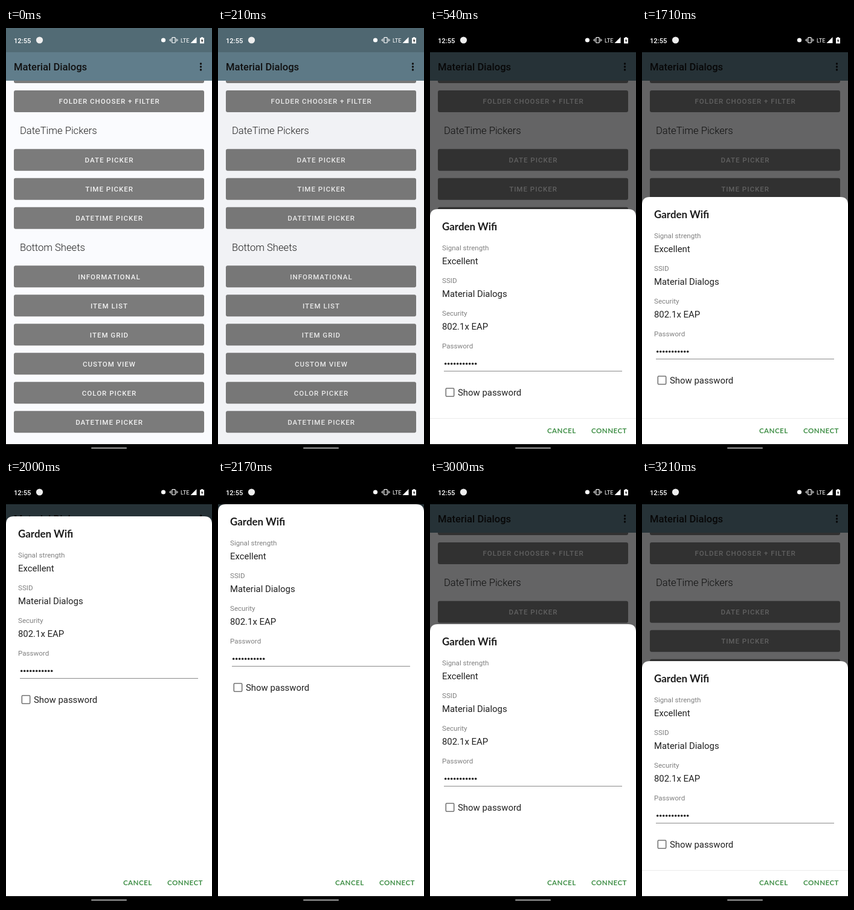
An HTML page for the animation above (3.37 s loop, 341 px wide and 700 px high).

```html
<!DOCTYPE html>
<html lang="en">
<head>
<meta charset="utf-8">
<title>Bottom sheet demo</title>
<style>
  html, body { margin: 0; height: 100%; overflow: hidden; background: #000; }
  svg { display: block; width: 100vw; height: 100vh; font-family: Roboto, sans-serif; }
  .button { font-size: 11.5px; font-weight: 500; letter-spacing: 1px; fill: #f2f2f2; text-anchor: middle; }
  .heading { font-size: 16.6px; font-weight: 300; fill: #222; }
  .label { font-size: 11.6px; fill: #808080; }
  .value { font-size: 14.9px; fill: #212121; }
  .title { font: 700 16.9px Lato, sans-serif; fill: #1c1c1c; }
  .action { font: 700 11.6px Lato, sans-serif; letter-spacing: .45px; fill: #43914a; }
</style>
</head>
<body>
<svg viewBox="0 0 341 700">
  <rect width="341" height="700" fill="#fafbfe"/>
  <g id="list"></g>
  <rect y="40" width="341" height="47" fill="#607d8b"/>
  <text x="13" y="70" font-size="16.6" font-weight="500" fill="#111">Material Dialogs</text>
  <g fill="#111">
    <circle cx="322.5" cy="59" r="1.7"/><circle cx="322.5" cy="64" r="1.7"/><circle cx="322.5" cy="69" r="1.7"/>
  </g>
  <rect width="341" height="40" fill="#526b75"/>
  <rect id="dim" width="341" height="700"/>
  <rect id="statusShade" width="341" height="40"/>

  <!-- status icons -->
  <g fill="#fff">
    <text x="13" y="24.5" font-size="11.2" font-weight="500">12:55</text>
    <circle cx="55.5" cy="20" r="5.6" fill="#eee"/>
    <circle cx="260.5" cy="20" r="3.6"/>
    <rect x="274.8" y="15.7" width="5.4" height="8.8" rx="1" fill="none" stroke="#fff" stroke-width="1.2"/>
    <path d="M272.7 17.5v5M271 18.7v2.6M282.3 17.5v5M284 18.7v2.6" stroke="#fff"/>
    <text x="289" y="24" font-size="9.3">LTE</text>
    <path d="M305.5 25H315.500V15Z"/>
    <path d="M323.200 15h2.600v1.200h2.200v9.300h-7v-9.300h2.200Z"/>
    <path d="M325 17.500l-2.200 4h1.500v2.700l2.200-4h-1.500Z" fill="#222"/>
  </g>

  <g id="windowLayer">
    <g id="sheet">
      <path d="M0 700V13Q0 0 13 0H328Q341 0 341 13V700Z" fill="#fff"/>
      <text class="title" x="20" y="35">Garden Wifi</text>
      <g id="fields"></g>
      <path d="M23 267.500H318" stroke="#8a8a8a"/>
      <rect x="26.300" y="295.800" width="13.400" height="13.400" rx="1.500" fill="none" stroke="#757575" stroke-width="1.600"/>
      <text class="value" x="46" y="308">Show password</text>
    </g>
    <g id="actions">
      <rect y="644" width="341" height="43" fill="#fff"/>
      <path id="divider" d="M0 644.500H341" stroke="#ebebeb"/>
      <text class="action" x="194" y="669">CANCEL</text>
      <text class="action" x="267" y="669">CONNECT</text>
    </g>
  </g>

  <rect y="687" width="341" height="13"/>
  <rect x="141" y="692.500" width="59" height="2" rx="1" fill="#a6a6a6"/>
</svg>
<script>
const $ = id => document.getElementById(id);
const clamp = x => Math.min(1, Math.max(0, x));
const decelerate = x => 1 - (1 - clamp(x)) ** 2;

function add(parent, tag, attrs, text = '') {
  const node = document.createElementNS('http://www.w3.org/2000/svg', tag);
  for (const name in attrs) node.setAttribute(name, attrs[name]);
  node.textContent = text;
  parent.append(node);
}

function addButton(y, text) {
  add($('list'), 'rect', { x: 13, y, width: 315, height: 36, rx: 3, fill: '#7b7b7b' });
  add($('list'), 'text', { class: 'button', x: 171, y: y + 22.3 }, text);
}

function addSection(y, heading, buttons) {
  add($('list'), 'text', { class: 'heading', x: 23, y }, heading);
  buttons.forEach((text, i) => addButton(y + 24.5 + i * 48, text));
}

addButton(55, '');
addButton(103, 'FOLDER CHOOSER + FILTER');
addSection(175.3, 'DateTime Pickers', ['DATE PICKER', 'TIME PICKER', 'DATETIME PICKER']);
addSection(367.8, 'Bottom Sheets', ['INFORMATIONAL', 'ITEM LIST', 'ITEM GRID',
  'CUSTOM VIEW', 'COLOR PICKER', 'DATETIME PICKER']);

[['Signal strength', 'Excellent'], ['SSID', 'Material Dialogs'],
 ['Security', '802.1x EAP'], ['Password', '']].forEach(([label, value], i) => {
  add($('fields'), 'text', { class: 'label', x: 20, y: 68.3 + i * 54 }, label);
  add($('fields'), 'text', { class: 'value', x: 20, y: 91 + i * 54 }, value);
});
for (let i = 0; i < 11; i++)
  add($('fields'), 'circle', { cx: 25.7 + i * 5, cy: 255.3, r: 1.75, fill: '#212121' });

const LOOP = 3370, FPS = 24, BOTTOM = 687, PEEK = 388;

// Dragging and settling: [step, top of sheet]
const drag = [[40, 299], [41, 279], [42, 250], [44, 177], [46, 110], [47, 82], [48, 60],
  [49, 50], [50, 44], [52, 40], [67, 40], [68, 75], [70, 163], [72, 238], [74, 281],
  [76, 297], [77, 299]];

function sheetTop(step, t) {
  if (step <= 40) return BOTTOM - PEEK * decelerate((t - 250) / 250);
  const i = drag.findIndex(p => p[0] >= step);
  if (i < 0) return 299;
  const [s0, y0] = drag[i - 1], [s1, y1] = drag[i];
  return y0 + (y1 - y0) * (step - s0) / (s1 - s0);
}

function draw(now) {
  const step = Math.floor((now % LOOP + 3.4) * FPS / 1000);
  const t = step * 1000 / FPS;
  const top = sheetTop(step, t);
  const shown = decelerate((t - 210) / 150);
  $('dim').setAttribute('opacity', 0.6 * clamp((t - 197) / 200));
  $('statusShade').setAttribute('opacity', shown);
  $('windowLayer').setAttribute('opacity', shown);
  $('sheet').setAttribute('transform', `translate(0 ${top})`);
  $('actions').setAttribute('transform', `translate(0 ${43 * (1 - decelerate((t - 350) / 180))})`);
  $('divider').setAttribute('opacity', top > 240 ? 1 : 0);
}

const start = performance.now();
function tick() {
  draw(performance.now() - start);
  requestAnimationFrame(tick);
}
tick();
</script>
</body>
</html>
```
